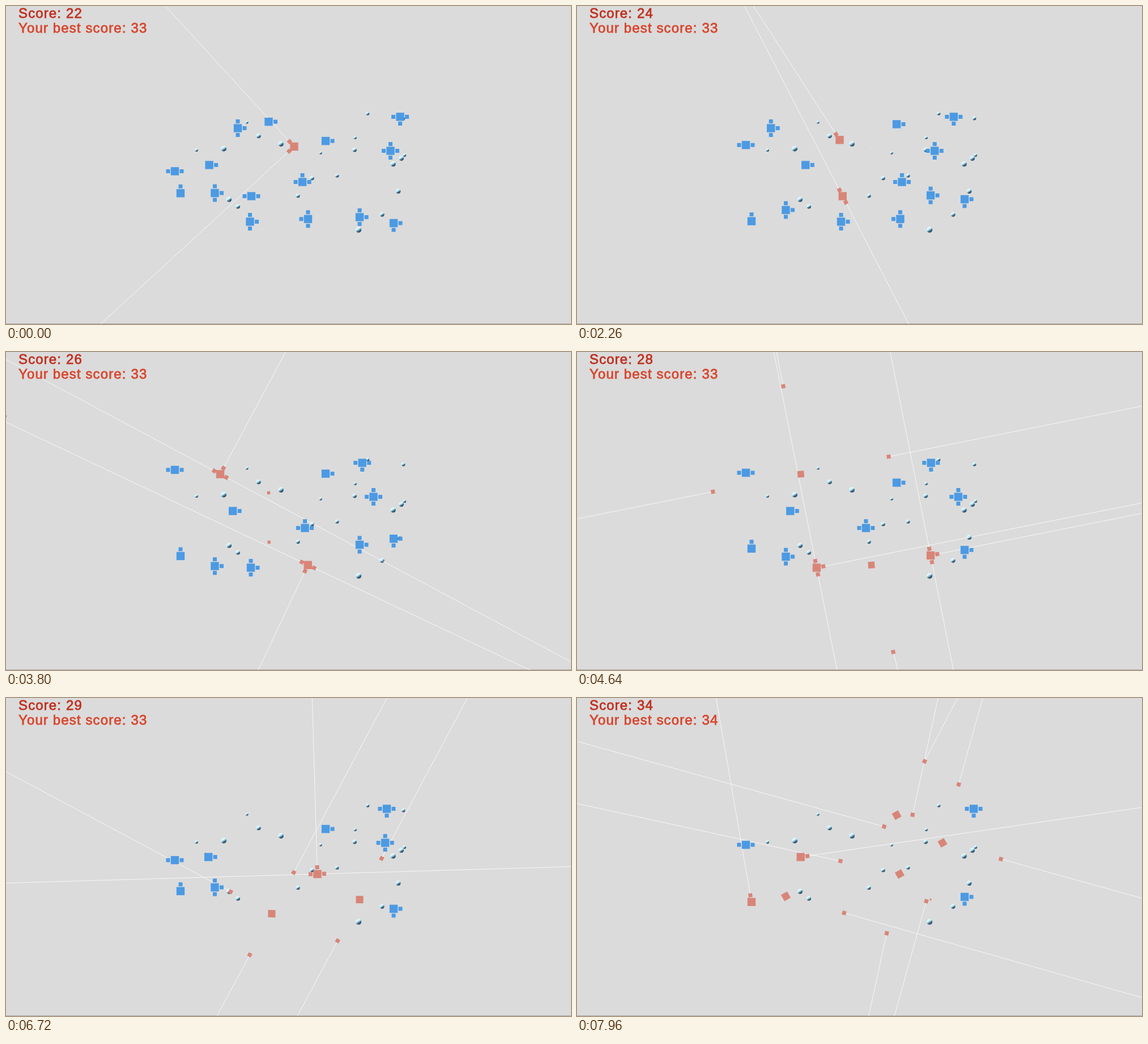
An HTML page that plays this animation: 997 px wide and 561 px high, repeating every 8000 ms.

```html
<!DOCTYPE html>
<html lang="en">
<head>
<meta charset="utf-8">
<title>Chain shots</title>
<style>
  html, body { margin: 0; width: 100%; height: 100%; overflow: hidden; background: #dbdbdb; }
  svg { display: block; width: 100vw; height: 100vh; }
  text { font: 24px "Liberation Sans", Arial, sans-serif; letter-spacing: 1.13px; stroke-width: .8; white-space: pre; }
  line { stroke: #fff; stroke-width: 1; stroke-opacity: .75; }
</style>
</head>
<body>
<svg id="stage" viewBox="0 0 997 561">
  <defs>
    <linearGradient id="shade" x1=".25" y1=".1" x2=".75" y2=".9">
      <stop offset="0" stop-color="#d5f1f8"/>
      <stop offset=".3" stop-color="#e2f8fc"/>
      <stop offset=".5" stop-color="#9cc9dc"/>
      <stop offset=".72" stop-color="#41708c"/>
      <stop offset="1" stop-color="#1d3a50"/>
    </linearGradient>
  </defs>
  <rect width="997" height="561" fill="#dbdbdb"/>
  <rect y="560" width="997" height="1" fill="#a8a8a8"/>
  <g id="balls"></g>
  <g id="rays"></g>
  <g id="blocks"></g>
  <text id="score" x="22" y="21" fill="#c0301f" stroke="#c0301f"></text>
  <text id="best" x="22" y="47" fill="#d8452c" stroke="#d8452c"></text>
</svg>
<script>
const LOOP = 8000;
const MOVE = 225, TURN = 363;   // when blocks start to slide and the first one to turn
const BODY = 14.4, ARM = 7, REACH = 12, FAR = 1300;
const SPIN = 0.0726;            // degrees per ms while armed
const SPEED = 0.492;            // bullet pixels per ms
const TUMBLE = 0.62;            // degrees per ms once spent
const FADE = 2000;
const BLUE = '#4c9ae3', RED = '#d88578';
const SHOTS = [480, 2775, 4344, 6578, 7768];
const SIDES = { right: 0, up: 90, left: 180, down: 270 };

const byId = id => document.getElementById(id);

function set(el, attrs) {
  for (const key in attrs) el.setAttribute(key, attrs[key]);
}

function add(parent, tag, attrs = {}) {
  const el = document.createElementNS('http://www.w3.org/2000/svg', tag);
  set(el, attrs);
  return byId(parent).appendChild(el);
}

// Ordered from the smallest ball to the largest.
const balls = [
  [425, 205], [555, 259], [616, 232], [336, 254], [703, 263], [638, 189.5], [701, 198],
  [584, 299], [515, 334.5], [540, 303.5], [615, 253.5], [409, 353.5], [663.5, 367.5], [445.5, 229],
  [692, 326.5], [697.5, 268.5], [393.5, 341], [683, 278.5], [485, 243], [384, 251.5], [622, 394.5]
];
balls.forEach(([cx, cy], i) => add('balls', 'circle', { cx, cy, r: 2.6 + i * 0.13, fill: 'url(#shade)' }));

// A block slides between two ends of its lane, reaching them in turn at the given times.
// Each arm names the block that its bullet will strike, if any.
const blocks = {};
function block(name, axis, lane, ends, turns, arms, hit = Infinity) {
  const fire = hit < Infinity ? SHOTS.find(s => s > Math.max(hit, 0)) ?? Infinity : Infinity;
  blocks[name] = { axis, lane, ends, turns, arms, hit, fire };
}

block('p', 'y', 508.5, [248, 250], [363, 480], { right: 'b', up: 'g' }, TURN - 132.5 / SPIN);
block('a', 'x', 215.5, [409, 336], [225, 2450, 4796], { right: '', up: '', down: '' }, 2949);
block('b', 'y', 463.5, [249, 196], [-1625, 562, 2798], { right: 'a' }, 570);
block('c', 'y', 298, [198, 293], [-3840, 290, 4212, 6920, 9826], { left: '', right: '' });
block('d', 'x', 280.5, [336.5, 421], [-784, 3069, 6039, 8830], { right: '' }, 7847);
block('e', 'y', 308, [382.5, 327.5], [-1720, 328, 2367, 5870, 9430], { up: '' }, 7825);
block('f', 'y', 368.5, [382, 328], [-3186, 356, 3581, 6320, 9897], { right: 'd', up: 'e', down: '' }, 6747);
block('g', 'x', 335.5, [433, 471], [225, 2389, 4535], { left: 'j', right: '' }, 645);
block('h', 'x', 380.5, [418, 470.5], [-349, 2057, 4436, 6643], { right: 'f', up: '', down: 'k' }, 4486);
block('i', 'x', 310.5, [507, 581], [-269, 2006, 4489, 8380], { left: '', up: '', right: '' }, 6698);
block('j', 'x', 375.8, [519.5, 581], [-225, 1827, 4344], { left: '', up: 'h', down: 'l' }, 2910);
block('k', 'y', 564, [252.5, 198.5], [-768, 2950, 5802, 8115], { right: '' }, 6907);
block('l', 'y', 624, [382, 321], [-279, 2955, 5668, 7777], { right: 'i', up: '', down: 'n' }, 4486);
block('m', 'y', 684, [383, 318.5], [225, 3343, 6064, 9873], { right: '', down: '' });
block('n', 'x', 255.5, [697.5, 619], [-596, 2786, 5490, 8893], { right: '', up: '', left: '', down: '' }, 6742);
block('o', 'x', 195.5, [617, 704], [-3139, 588, 4300, 8136], { left: '', right: '', down: '' });

const all = Object.values(blocks);
for (const b of all) {
  b.el = add('blocks', 'rect');
  b.parts = Object.entries(b.arms).map(([side, victim]) => ({
    angle: SIDES[side],
    end: victim ? blocks[victim].hit : Infinity,
    ray: add('rays', 'line'),
    el: add('blocks', 'rect')
  }));
}

function slide({ ends, turns, fire }, t) {
  const now = Math.max(turns[0], MOVE, Math.min(t, fire, turns.at(-1)));
  const leg = Math.max(1, turns.findIndex(turn => turn >= now));
  const k = (now - turns[leg - 1]) / (turns[leg] - turns[leg - 1]);
  const from = ends[(leg - 1) % 2], to = ends[leg % 2];
  return from + (to - from) * k;
}

function square(el, x, y, size, angle, fill) {
  set(el, {
    x: -size / 2, y: -size / 2, width: size, height: size, fill,
    transform: `translate(${x} ${y}) rotate(${-angle})`
  });
}

function drawBlock(b, t) {
  const place = slide(b, t);
  const [x, y] = b.axis === 'x' ? [place, b.lane] : [b.lane, place];
  const hit = t >= b.hit;
  const fill = hit ? RED : BLUE;
  const spent = Math.max(0, t - b.fire);
  const size = BODY * Math.max(0, 1 - spent / FADE) ** 1.35;
  square(b.el, x, y, size, spent * TUMBLE, fill);

  const turn = hit ? SPIN * (Math.min(Math.max(t, TURN), b.fire) - b.hit) : 0;
  const reach = REACH + spent * SPEED;
  for (const part of b.parts) {
    const shown = t < part.end && reach < FAR;
    const angle = part.angle + turn;
    const dx = Math.cos(angle * Math.PI / 180), dy = -Math.sin(angle * Math.PI / 180);
    const px = x + dx * reach, py = y + dy * reach;
    square(part.el, px, py, ARM, angle, fill);
    set(part.el, { visibility: shown ? 'visible' : 'hidden' });
    set(part.ray, {
      x1: px, y1: py, x2: px + dx * FAR, y2: py + dy * FAR,
      visibility: shown && hit ? 'visible' : 'hidden'
    });
  }
}

function draw(t) {
  for (const b of all) drawBlock(b, t);
  const score = 21 + all.filter(b => t >= b.hit).length;
  byId('score').textContent = `Score: ${score}`;
  byId('best').textContent = `Your best score: ${Math.max(33, score)}`;
}

const begin = performance.now();
function tick() {
  draw((performance.now() - begin) % LOOP);
  requestAnimationFrame(tick);
}
tick();
</script>
</body>
</html>
```
